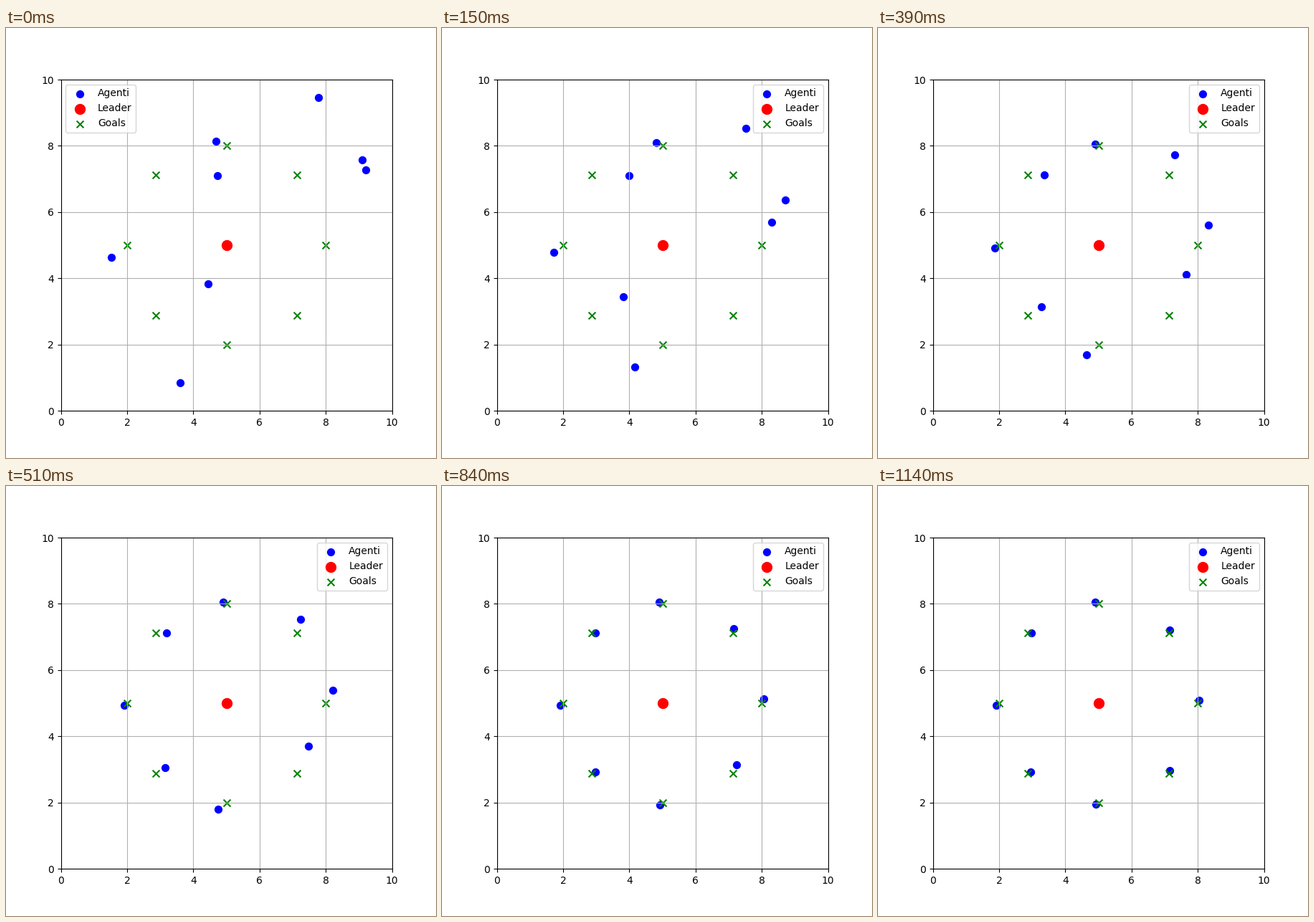
A matplotlib script that plays this animation: 600x600 px, repeating every 1.53 s.

```python
import numpy as np
import matplotlib.pyplot as plt
from matplotlib.animation import FuncAnimation

FRAMES, INTERVAL = 51, 30
STEPS_PER_FRAME = 2
GAIN = 0.05         # share of the remaining way covered in one step
TOLERANCE = 0.1     # an agent this close to its goal stands still

# Points of the plane are complex numbers: x + y·j
leader = 5 + 5j
goals = leader + 3 * np.exp(2j * np.pi * np.arange(8) / 8)

# One key point per agent: where it sets out for its goal
starts = np.array([9.203 + 7.273j, 7.786 + 9.459j, 4.693 + 8.143j, 4.736 + 7.091j,
                   1.528 + 4.636j, 4.438 + 3.828j, 3.609 + 0.851j, 9.102 + 7.576j])
steps_needed = np.ceil(np.log(TOLERANCE / abs(starts - goals)) / np.log(1 - GAIN))


def xy(points):
    return np.column_stack([np.real(points), np.imag(points)])


def agent_positions(frame):
    steps = np.minimum(frame * STEPS_PER_FRAME, steps_needed)
    return goals + (starts - goals) * (1 - GAIN) ** steps


fig, ax = plt.subplots(figsize=(6, 6), dpi=100)
ax.set(xlim=(0, 10), ylim=(0, 10), aspect="equal")
ax.grid(True)


def scatter(points, color, size, label, marker="o"):
    return ax.scatter(*xy(points).T, c=color, s=size, label=label, marker=marker)


agents = scatter(starts, "blue", 50, "Agenti")
scatter(leader, "red", 100, "Leader")
scatter(goals, "green", 50, "Goals", marker="x")
legend = ax.legend(loc="upper left")


def update(frame):
    agents.set_offsets(xy(agent_positions(frame)))
    # The legend leaves the right corner free while an agent is there
    legend.set_loc("upper left" if frame == 0 else "upper right")
    return agents, legend


animation = FuncAnimation(fig, update, frames=FRAMES, interval=INTERVAL,
                          init_func=lambda: update(0), repeat=True)
plt.show()
```
